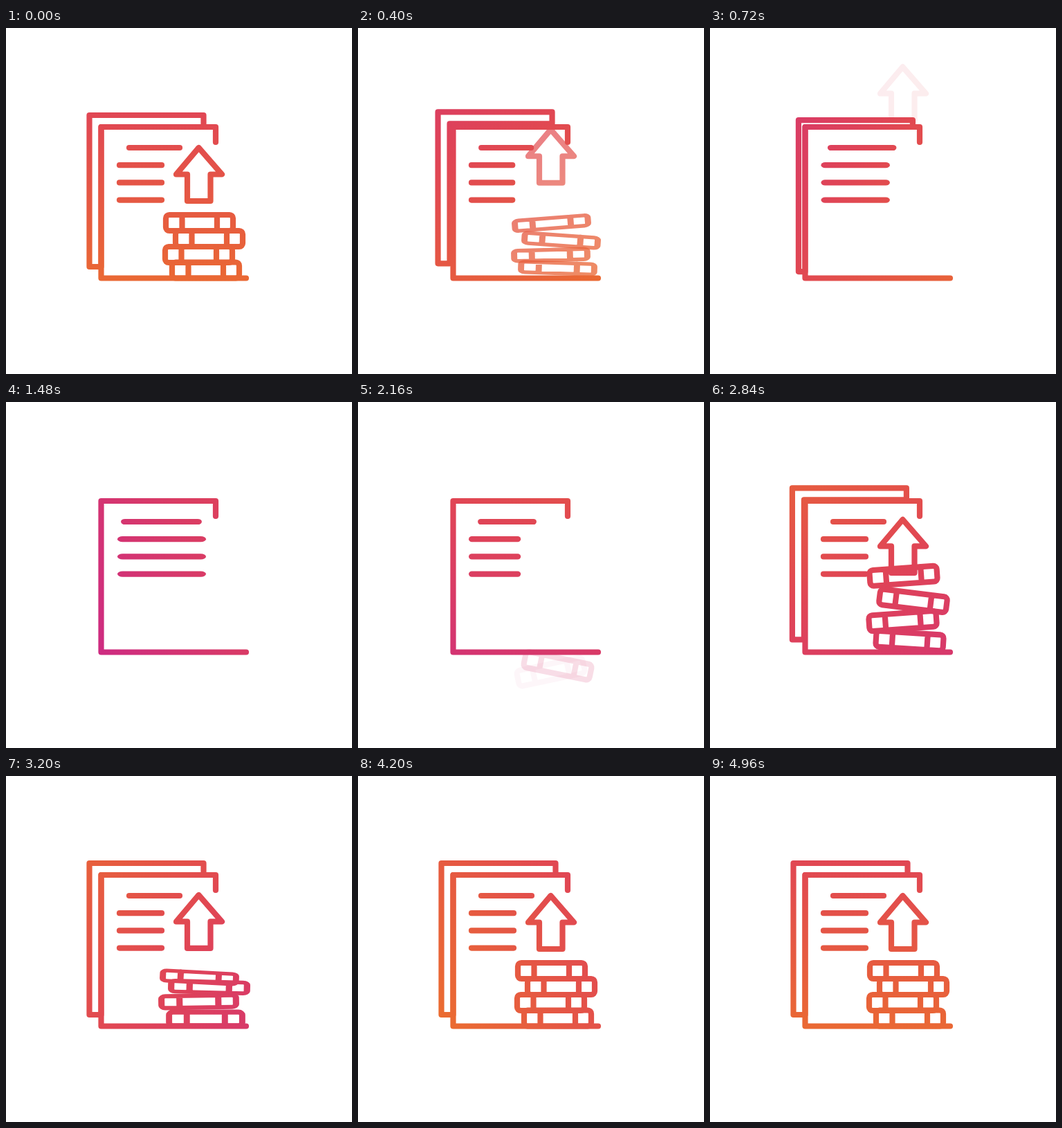
An HTML page with a canvas that plays this animation: 500x500 px, repeating every 5000 ms.

```html
<!DOCTYPE html>
<html lang="en">
<head>
<meta charset="utf-8">
<title>Growing report</title>
<style>
  html, body { margin: 0; width: 100%; height: 100%; overflow: hidden; background: #fff; }
  canvas { display: block; width: 500px; height: 500px; }
</style>
</head>
<body>
<canvas id="stage"></canvas>
<script>
const LOOP = 5000;
const canvas = document.getElementById('stage');
const ctx = canvas.getContext('2d');
const ratio = window.devicePixelRatio || 1;
canvas.width = canvas.height = 500 * ratio;

const clamp = u => Math.max(0, Math.min(1, u));
const linear = u => u;
const smooth = u => u * u * (3 - 2 * u);
const easeOut = u => 1 - (1 - u) ** 3;

// Interpolates through [time, value, ease] keys.
function track(t, ...keys) {
  if (t <= keys[0][0]) return keys[0][1];
  for (let i = 1; i < keys.length; i++) {
    const [t0, v0] = keys[i - 1];
    const [t1, v1, ease = smooth] = keys[i];
    if (t <= t1) return v0 + (v1 - v0) * ease((t - t0) / (t1 - t0));
  }
  return keys[keys.length - 1][1];
}

function polyline(points, closed) {
  ctx.beginPath();
  points.forEach(([x, y]) => ctx.lineTo(x, y));
  if (closed) ctx.closePath();
  ctx.stroke();
}

function drawBackPage(t) {
  const o = track(t, [0, 0], [200, -16], [400, -5, linear], [600, 4, linear], [960, 17],
    [2200, 17], [2480, 4], [2720, -2], [3150, 0]);
  if (o > 16.9) return;
  const inner = Math.min(o, 0);
  const left = 120.5 + o, top = 126 + o * 0.95, right = 285.5 + o, bottom = 345 + o * 0.95;
  const inX = 137.5 + inner, inY = 143 + inner * 0.95;
  polyline([[left, top], [right, top], [right, inY], [inX, inY], [inX, bottom], [left, bottom]], true);
}

function drawFrontPage() {
  polyline([[303, 165], [303, 143], [137.5, 143], [137.5, 361.5], [347, 361.5]]);
}

function drawTextLines(t) {
  const k = track(t, [200, 0], [420, -0.03], [1000, 1], [1760, 1], [2260, 0]);
  for (let i = 0; i < 4; i++) {
    const first = i === 0;
    const half = first ? 36.5 : 30.5;
    const x = first ? 214.5 + 10 * k : 194.5 + 30.5 * k;
    ctx.save();
    ctx.translate(x, 173 + 25.2 * i);
    ctx.scale(1 + (first ? 0.44 : 0.85) * k, 1);
    polyline([[-half, 0], [half, 0]]);
    ctx.restore();
  }
}

function drawArrow(t) {
  const dy = track(t, [240, 0], [773, -120], [2230, -120], [2580, 6], [2900, -4], [3350, 0]);
  const alpha = track(t, [240, 1], [773, 0, linear], [2230, 0], [2530, 1, linear]);
  ctx.save();
  ctx.globalAlpha = alpha;
  ctx.translate(278.5, 173 + dy);
  polyline([[0, 0], [33.5, 38.5], [17, 38.5], [17, 77], [-16.5, 77], [-16.5, 38.5], [-32.5, 38.5]], true);
  ctx.restore();
}

// Bottom book first: leave, enter and land describe the three poses of each one.
const books = [
  { x: 288.5, y: 350, leave: { dy: -3, turn: 2 }, enter: { dy: -13, turn: 8 },
    land: { dy: 1, turn: 0, sx: 1.09, sy: 0.86 } },
  { x: 278.5, y: 327.5, leave: { dy: 0.5, turn: -1.5 }, enter: { dy: -21, turn: -8 },
    land: { dy: -1.5, turn: -1, sx: 1.11, sy: 0.74 } },
  { x: 293.5, y: 304.5, leave: { dy: 2.5, turn: 4 }, enter: { dy: -31, turn: 14 },
    land: { dy: 0.5, turn: 1.5, sx: 1.13, sy: 0.68 } },
  { x: 279.5, y: 281.5, leave: { dy: 0.5, turn: -4.5 }, enter: { dy: -51, turn: -13 },
    land: { dy: 9.5, turn: 3, sx: 1.09, sy: 0.64 } }
];

function drawBook({ x, y, leave, enter, land }, i, t) {
  const start = 2080 + 60 * i;
  const settle = 3800 + 30 * i;
  const dy = t < 1500
    ? track(t, [160, 0], [400, leave.dy], [660, leave.dy - 15])
    : track(t, [start, 78], [start + 380, enter.dy, easeOut], [3150, land.dy], [3280, land.dy], [settle, 0]);
  const turn = t < 1500
    ? track(t, [160, 0], [400, leave.turn], [660, leave.turn * 2])
    : track(t, [start, enter.turn * 1.5], [2480, enter.turn], [3150, land.turn], [3280, land.turn], [settle, 0]);
  const scale = (out, into) => track(t, [120, 1], [380, out], [420, out], [660, 1],
    [2800, 1], [3150, into], [3300, into], [settle, 1]);
  const alpha = track(t, [320, 1], [660, 0, linear], [start, 0], [start + 480, 1, linear]);
  if (!alpha) return;

  ctx.save();
  ctx.globalAlpha = alpha;
  ctx.translate(x, y + dy);
  ctx.rotate(turn * Math.PI / 180);
  ctx.scale(scale(1.09, land.sx), scale(0.65, land.sy));
  ctx.beginPath();
  ctx.roundRect(-48.5, -11.5, 97, 23, 5);
  for (const rib of [-25, 25.5]) {
    ctx.moveTo(rib, -11.5);
    ctx.lineTo(rib, 11.5);
  }
  ctx.stroke();
  ctx.restore();
}

// Tints everything drawn so far with a turning gradient.
function tint(t) {
  const angle = track(t, [0, 0], [400, 29, linear], [1480, 118, linear], [2480, 179, linear],
    [3200, 230, linear], [4200, 302, linear], [LOOP, 360, linear]) * Math.PI / 180;
  const mid = track(t, [0, 0.66], [400, 0.62, linear], [1480, 0.3], [2480, 0.47],
    [3200, 0.53, linear], [4200, 0.65, linear], [LOOP, 0.66, linear]);
  const length = 830;
  const dx = Math.sin(angle) * length, dy = Math.cos(angle) * length;
  const x = 233 - dx * mid, y = 245 - dy * mid;
  const paint = ctx.createLinearGradient(x, y, x + dx, y + dy);
  paint.addColorStop(0, '#c72290');
  paint.addColorStop(0.5, '#e04555');
  paint.addColorStop(1, '#f07f1e');
  ctx.globalCompositeOperation = 'source-in';
  ctx.fillStyle = paint;
  ctx.fillRect(0, 0, 500, 500);
  ctx.globalCompositeOperation = 'source-over';
}

function draw(t) {
  ctx.setTransform(ratio, 0, 0, ratio, 0, 0);
  ctx.clearRect(0, 0, 500, 500);
  ctx.lineWidth = 8.2;
  ctx.lineCap = ctx.lineJoin = 'round';
  drawBackPage(t);
  drawFrontPage();
  drawTextLines(t);
  drawArrow(t);
  books.forEach((book, i) => drawBook(book, i, t));
  tint(t);
}

function tick() {
  draw(performance.now() % LOOP);
  requestAnimationFrame(tick);
}
tick();
</script>
</body>
</html>
```
